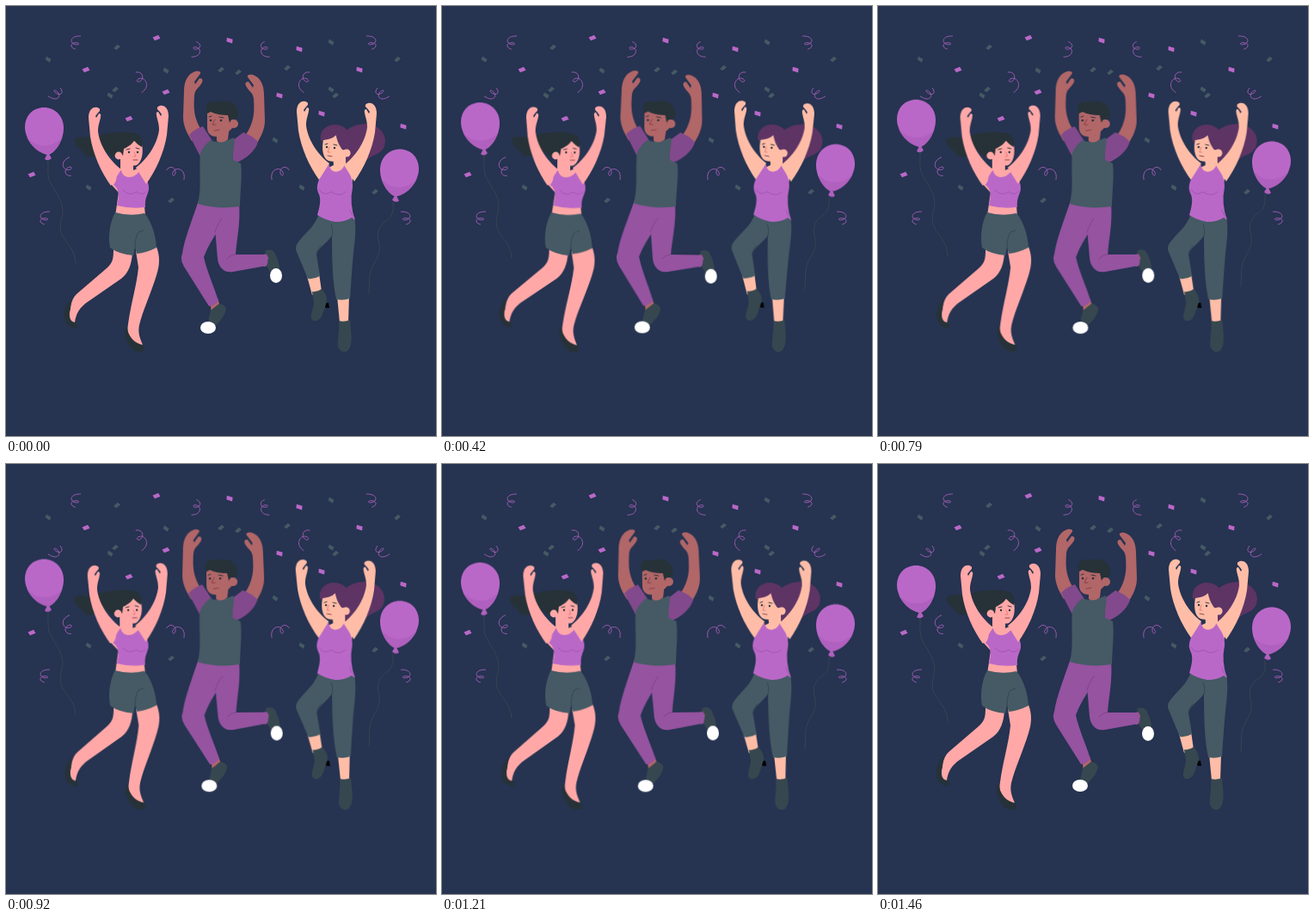
Write an HTML page that moves like this. It is 500 by 500 pixels and loops after 1.5 s.

```html
<!DOCTYPE html>
<html lang="en">
<head>
<meta charset="utf-8">
<title>Party</title>
<style>
html, body { margin: 0; width: 100%; height: 100%; overflow: hidden; background: #263351; }
svg { display: block; width: 100vw; height: 100vh; }
.purple { fill: #ba68c8; }
.shade { fill: #b060be; }
.plum { fill: #9553a0; }
.deep { fill: #82498c; }
.slate { fill: #455a64; }
.boot { fill: #37474f; }
.ink { fill: #263238; }
.pink { fill: #ffa8a7; }
.brown { fill: #b16668; }
.peach { fill: #ffbda7; }
.mane { fill: #5d3464; }
.white { fill: #fff; }
.line { fill: none; stroke-width: .9; stroke-linecap: round; stroke-linejoin: round; }
.fold { stroke: #9c55aa; }
.crease { stroke: #34464f; }
.seam { stroke: #7f4389; }
.brow { stroke: #263238; }
.lip { stroke: #8b3c40; }
.nose { stroke: #e57a76; }
.string { stroke: #3a4952; }
.curl { stroke: #ba68c8; opacity: .85; }
</style>
</head>
<body>
<svg viewBox="0 0 500 500">
  <defs>
    <path id="curl" class="line curl" vector-effect="non-scaling-stroke"
      d="M-12 0C-10-7-2-6-1 0C0 5-5 5-4 0C-3-7 10-8 11 5"/>
    <path id="chip" d="M-4.2-1.6L2.8-2.6L4.2 1.8L-2.8 2.6Z"/>
    <path id="arm" d="M122 209C111 194 101 172 98 152L96 130C96 122 100 117 106 118C110 119 110 122 107 124L104 128L105 130L108 125Q111 125 110 129C109 135 107 138 107 146C109 163 121 180 134 190Z"/>
    <path id="longarm" d="M216 157C210 147 206 139 206 129L207 99C207 88 211 79 220 76C225 75 228 77 225 80L219 88L220 91L225 84Q230 84 228 89C224 96 220 96 219 104C218 119 218 131 229 147Z"/>
    <g id="balloon">
      <path class="purple" d="M44 118C57 118 67 128 67 142C67 157 57 171 49 173C36 171 22 156 22 141C22 127 32 118 44 118Z"/>
      <path class="shade" d="M24 152C34 165 54 166 65 153C61 163 55 171 49 173C38 171 29 163 24 152Z"/>
      <path class="shade" d="M48 172L50 172L53 177Q49 181 45 178Z"/>
    </g>
  </defs>
  <g id="confetti"></g>

  <g class="floater">
    <path class="line string" d="M49 179C49 191 48 200 52 206C57 216 66 226 66 239C65 249 60 258 66 268C71 277 80 283 81 299"/>
    <use href="#balloon"/>
  </g>
  <g class="floater">
    <path class="line string" d="M450 228C451 240 448 246 443 249C433 256 431 264 433 272C436 284 433 292 428 299C421 310 423 322 422 335"/>
    <use href="#balloon" transform="translate(502 48.5) scale(-1 1)"/>
  </g>

  <g class="dancer" style="transform-origin:128px 260px">
    <path class="ink" d="M122 147C112 149 104 153 94 153C86 151 78 153 80 159C81 164 88 167 92 173C94 177 101 175 106 174C113 172 118 170 122 164Z"/>
    <path class="ink" d="M116 151C125 145 146 146 153 149C159 153 160 160 157 165L134 178L122 174C113 167 111 157 116 151Z"/>
    <path class="pink" d="M125 283C125 294 124 299 117 305L82 335C75 342 74 354 73 366L80 368C81 358 86 350 95 344L134 317C143 310 146 300 147 287Z"/>
    <path class="ink" d="M76 340C71 345 67 353 68 362C69 370 75 375 83 374L82 368C75 369 72 361 75 352Z"/>
    <path class="pink" d="M151 285L175 280C179 291 179 300 175 313C169 333 159 354 155 371C153 380 156 387 159 394L151 394C144 390 140 380 142 370C145 347 152 325 154 304Z"/>
    <path class="ink" d="M140 372C136 378 138 387 145 397C149 402 156 403 161 401L160 394C151 393 144 387 141 376Z"/>
    <path class="pink" d="M133 175L148 183L148 191L160 186L164 199L160 222L162 244L127 244L131 217L121 206L133 190Z"/>
    <path class="purple" d="M128 194L134 191C136 203 154 202 158 185L162 188C160 197 167 205 166 213C165 220 161 223 162 234Q144 236 129 232C132 222 132 213 125 208Q130 202 128 194Z"/>
    <use href="#arm" class="pink"/>
    <use href="#arm" class="pink" transform="translate(285 -2) scale(-1 1)"/>
    <path class="line fold" d="M136 214Q143 222 152 216Q158 221 163 216"/>
    <path class="slate" d="M127 240Q144 245 161 241C168 249 174 264 175 281Q163 287 152 288L150 280L148 290Q132 289 121 281C118 266 122 248 127 240Z"/>
    <path class="line crease" d="M150 281Q150 269 154 263L160 261"/>
    <path class="pink" d="M134 163C140 163 146 158 149 156C152 160 155 161 158 161C160 171 158 181 152 185C145 187 137 183 134 177Z"/>
    <path class="ink" d="M124 156C132 146 146 146 151 153C148 160 142 164 137 166L136 174L128 169Z"/>
    <circle class="pink" cx="131" cy="174" r="4.4"/>
    <path class="ink" d="M147 150C156 149 160 155 158 164Q152 161 147 154Z"/>
    <circle class="ink" cx="143" cy="170" r="1.2"/><circle class="ink" cx="153" cy="170" r="1.2"/>
    <path class="line brow" d="M140 167L144 166M151 165L155 166"/>
    <path class="line lip" d="M148 179L153 179"/>
    <path class="line nose" d="M149 170L151 175L148 175"/>
  </g>

  <g class="dancer" style="transform-origin:262px 228px">
    <use href="#longarm" class="brown"/>
    <use href="#longarm" class="brown" transform="translate(507 4) scale(-1 1)"/>
    <path class="deep" d="M213 150Q219 143 229 140L240 157L227 177Z"/>
    <path class="deep" d="M264 156L276 147Q287 151 293 158C290 168 280 178 264 184Z"/>
    <path class="brown" d="M237 342L246 340L250 352L239 357Z"/>
    <path class="boot" d="M238 354L248 346Q254 347 256 352C254 362 248 367 242 373L235 367Z"/>
    <ellipse class="white" cx="235" cy="374" rx="9" ry="7"/>
    <path class="brown" d="M299 289L305 288L306 301L300 303Z"/>
    <path class="boot" d="M301 285Q307 281 312 286C315 293 318 299 318 306L307 309C305 304 302 302 302 299L305 293Z"/>
    <ellipse class="white" cx="314" cy="313.5" rx="7" ry="8.5"/>
    <path class="plum" d="M240 228L271 230C273 251 268 273 267 289L303 289Q306 295 303 302L264 309C252 311 247 302 246 294L243 258Z"/>
    <path class="plum" d="M224 226L264 231C256 250 238 270 230 292C234 310 242 326 247 343Q242 349 236 349L207 303Q202 295 205 288C207 272 216 250 224 226Z"/>
    <path class="line seam" d="M243 263Q246 253 251 247M267 289Q261 289 257 294"/>
    <path class="slate" d="M238 156Q247 161 265 153C267 160 263 170 264 179L273 183C275 198 272 218 272 233Q247 237 223 230C228 211 224 190 226 171Q230 162 238 156Z"/>
    <path class="brown" d="M245 146L260 139L258 155Q251 161 245 157Z"/>
    <path class="brown" d="M234 121L261 120L265 140C259 146 253 152 246 152C239 152 234 149 234 141Z"/>
    <circle class="brown" cx="265" cy="137" r="5"/>
    <path class="ink" d="M234 125C230 116 235 109 242 112C251 110 264 110 267 117C271 120 271 130 267 132Q262 130 260 136L258 127Q246 127 238 123Z"/>
    <circle class="ink" cx="238" cy="133" r="1.3"/><circle class="ink" cx="250" cy="133" r="1.3"/>
    <path class="line brow" d="M236 129L239 128M248 129L253 130"/>
    <path class="line lip" d="M243 132L240 138L244 138M242 145L248 144"/>
  </g>

  <g class="dancer" style="transform-origin:389px 256px">
    <path class="mane" d="M392 148C402 138 415 135 427 139C439 143 443 154 440 163C436 174 424 172 418 181C411 188 399 188 394 184Z"/>
    <path class="mane" d="M366 156C364 145 373 138 382 138C395 138 402 148 401 160L399 174L386 173Z"/>
    <path class="peach" d="M350 314L364 311L367 332L356 336Z"/>
    <path d="M368 345L375 345L376 351L372 351Z"/>
    <path class="boot" d="M356 332Q362 333 367 329Q374 337 373 344L367 361C363 367 357 368 355 363C354 357 358 351 358 345Z"/>
    <path class="peach" d="M385 337L399 337L398 368L388 368Z"/>
    <path class="boot" d="M387 366Q393 368 400 365C401 379 404 392 398 400C394 404 388 402 386 396C385 388 388 379 387 366Z"/>
    <path class="slate" d="M364 241L404 243C408 254 406 270 404 287C402 309 401 326 400 340Q392 343 384 341C380 322 379 299 379 267C372 277 363 281 361 289L365 314Q358 318 351 317L338 286Q335 280 341 273C350 262 360 255 364 241Z"/>
    <path class="line crease" d="M379 268Q381 259 378 254M361 289Q361 284 366 279"/>
    <path class="peach" d="M380 174L395 170L395 184L405 190L402 206L366 204L369 191L381 185Z"/>
    <path class="purple" d="M370 188L376 184C376 195 390 196 394 184L399 186C398 195 404 201 403 211Q399 230 406 249L402 246Q395 251 383 251Q371 249 362 243C365 233 367 224 363 217C359 208 366 199 370 188Z"/>
    <use href="#arm" class="peach" transform="translate(242 -7)"/>
    <use href="#arm" class="peach" transform="translate(527 -5) scale(-1 1)"/>
    <path class="line fold" d="M364 213Q369 222 378 216Q388 223 395 216M400 237Q401 243 405 246"/>
    <path class="peach" d="M369 156C377 155 381 153 384 150C386 157 391 163 395 166L394 175C389 180 381 182 375 180C368 177 367 165 369 156Z"/>
    <path class="mane" d="M383 145Q394 143 401 152L400 169L391 167C387 162 384 155 383 145Z"/>
    <circle class="peach" cx="396" cy="171" r="4.6"/>
    <circle class="ink" cx="373" cy="164" r="1.2"/><circle class="ink" cx="382" cy="165" r="1.2"/>
    <path class="line brow" d="M371 161L374 160M381 161L385 162"/>
    <path class="line nose" d="M376 164L374 170L377 170"/>
    <path class="line lip" d="M374 174L379 175"/>
  </g>
</svg>
<script>
const PERIOD = 1500, REST = 40;
const box = document.getElementById('confetti');

function place(id, x, y, turn, scale, cls = '') {
  const el = document.createElementNS('http://www.w3.org/2000/svg', 'use');
  el.setAttribute('href', '#' + id);
  el.setAttribute('class', cls);
  el.setAttribute('transform', `translate(${x} ${y}) rotate(${turn}) scale(${scale})`);
  box.append(el);
}

// Purple chips lean outwards from the middle.
const bright = [[30,196], [93,74], [143,131], [175,37], [186,100],
  [260,40], [318,104], [341,50], [367,125], [411,74], [462,140]];
bright.forEach(([x, y]) => place('chip', x, y, x < 250 ? -14 : 25, 1, 'purple'));

// Grey chips lean left and right in turn.
const dull = [[129,48], [49,62], [127,97], [186,75], [250,74], [121,104], [270,77], [378,97],
  [327,72], [96,211], [383,104], [313,156], [455,62], [344,211], [192,226], [378,42], [429,216]];
dull.forEach(([x, y], i) => place('chip', x, y, i % 2 ? 40 : -35, .9, 'slate'));

// Each curl has a mirrored partner: left x, right x, y, angle, length, depth.
const curls = [[81,425,42,-86,.68,1], [221,301,51,94,.78,.9], [157,347,88,62,1.04,1],
  [58,437,102,128,.7,1], [72,456,187,-108,.92,1], [198,318,194,16,.98,1], [45,465,246,-86,.66,1]];
for (const [left, right, y, turn, len, depth] of curls) {
  place('curl', left, y, turn, `${len} ${depth}`);
  place('curl', right, y, -turn, `${-len} ${depth}`);
}

// Runs evenly spaced poses [share, transform], then rests until the next loop.
function loop(selector, poses) {
  const frames = poses.map(([share, transform]) => ({ transform, offset: share * (1 - REST / PERIOD) }));
  frames.push({ transform: poses[0][1], offset: 1 });
  document.querySelectorAll(selector).forEach(el =>
    el.animate(frames, { duration: PERIOD, iterations: Infinity }));
}

loop('.dancer', [[0, 'rotate(0deg)'], [.25, 'rotate(1deg)'], [.75, 'rotate(-1deg)'], [1, 'rotate(0deg)']]);
loop('.floater', [[0, 'translateY(0px)'], [.5, 'translateY(-10px)'], [1, 'translateY(0px)']]);
</script>
</body>
</html>
```
